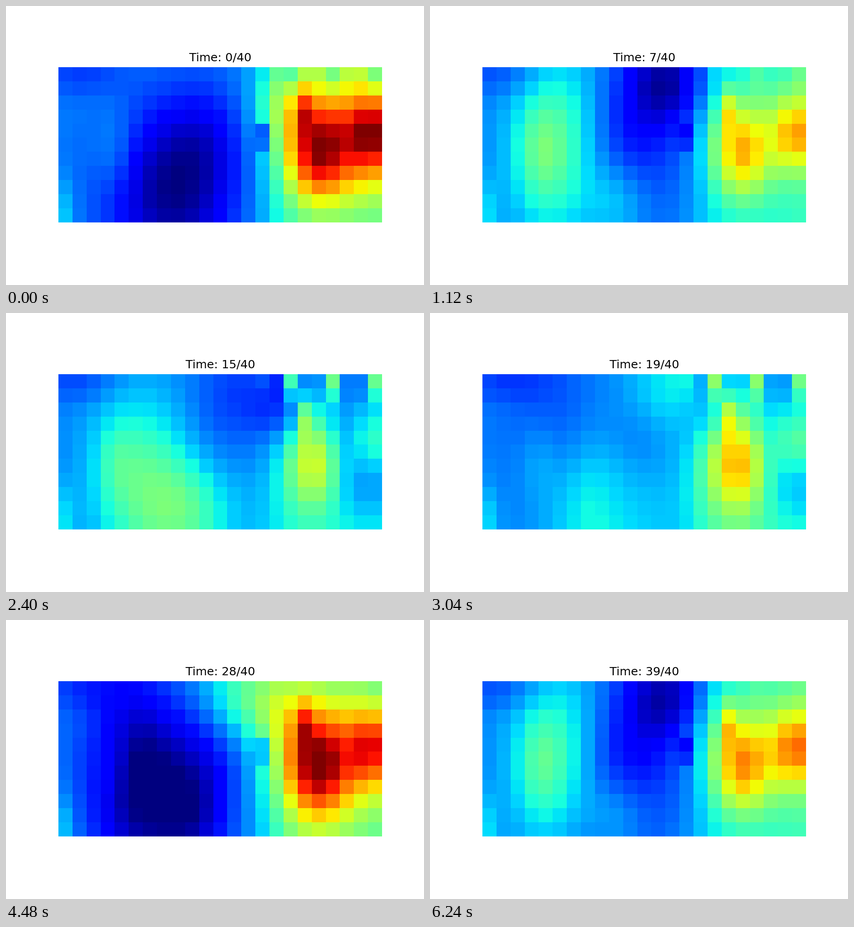
A matplotlib script that plays this animation: 917x611 px, repeating every 6.4 s.

```python
import numpy as np
import matplotlib.pyplot as plt
from matplotlib.animation import FuncAnimation

W, H, DPI = 917, 611, 100
LEFT, RIGHT, TOP, BOTTOM = 115, 825, 134, 474
FRAMES, INTERVAL = 40, 160
ROWS, COLS = 11, 23
PERIOD = 33

row, col = np.mgrid[0:ROWS, 0:COLS]


def blob(height, r, c, dr, dc):
    return height * np.exp(-((row - r) / dr) ** 2 - ((col - c) / dc) ** 2)


# Warm side to the right of a soft step, with a ripple along its top edge
step = 1 / (1 + np.exp(-(col - 14.5) / 0.9))
ripple = np.where(col > 14, np.cos(2 * np.pi * (col - 16) / 3), 0) * np.exp(-(row / 1.2) ** 2)
notch = blob(1, 4.4, 14, 0.8, 0.5)

mean = (0.25 + 0.17 * step + 0.05 * ripple - 0.09 * notch
        + blob(0.40, 5.5, 17.8, 3.5, 2.2)     # hot core
        + blob(0.15, 2.5, 17, 1.5, 0.6)       # spike above the core
        + blob(0.28, 4.2, 21.8, 2.6, 1.7)     # hot spot at the right edge
        + blob(-0.08, 4.5, 10, 4, 3)          # cold middle
        + blob(0.06, 5.5, 3.5, 3, 1.5)
        + blob(-0.06, 0, 1, 1.5, 3)
        + blob(0.08, 10, 0, 2.5, 0.8))

# The field sways around its mean in two quarter-shifted patterns
cos_part = (-0.1 * ripple - 0.1 * notch
            + blob(-0.23, 8.5, 7.5, 6, 4.5)
            + blob(0.32, 4.5, 21, 4.5, 4.5)
            + blob(0.13, 2, 15.5, 2.5, 2))

sin_part = (blob(0.24, 5.5, 4.7, 6.5, 3.2)
            + blob(0.11, 9, 9, 3, 2.2)
            + blob(-0.23, 0.5, 12.8, 3.2, 3.2)
            + blob(-0.14, 6, 17.5, 6, 4))


def field_at(t):
    phase = 2 * np.pi * t / PERIOD
    return mean + cos_part * np.cos(phase) + sin_part * np.sin(phase)


fig = plt.figure(figsize=(W / DPI, H / DPI), dpi=DPI, facecolor="white")
ax = fig.add_axes([LEFT / W, 1 - BOTTOM / H, (RIGHT - LEFT) / W, (BOTTOM - TOP) / H])
ax.axis("off")
image = ax.imshow(field_at(0), cmap="jet", vmin=0, vmax=1,
                  interpolation="nearest", aspect="auto")
title = ax.set_title("", fontsize=18.34, pad=9.8, family="DejaVu Sans")


def draw(i):
    image.set_data(field_at(i))
    title.set_text(f"Time: {i}/{FRAMES}")
    return image, title


anim = FuncAnimation(fig, draw, frames=FRAMES, interval=INTERVAL,
                     repeat=True, repeat_delay=0, blit=False)
plt.show()
```
